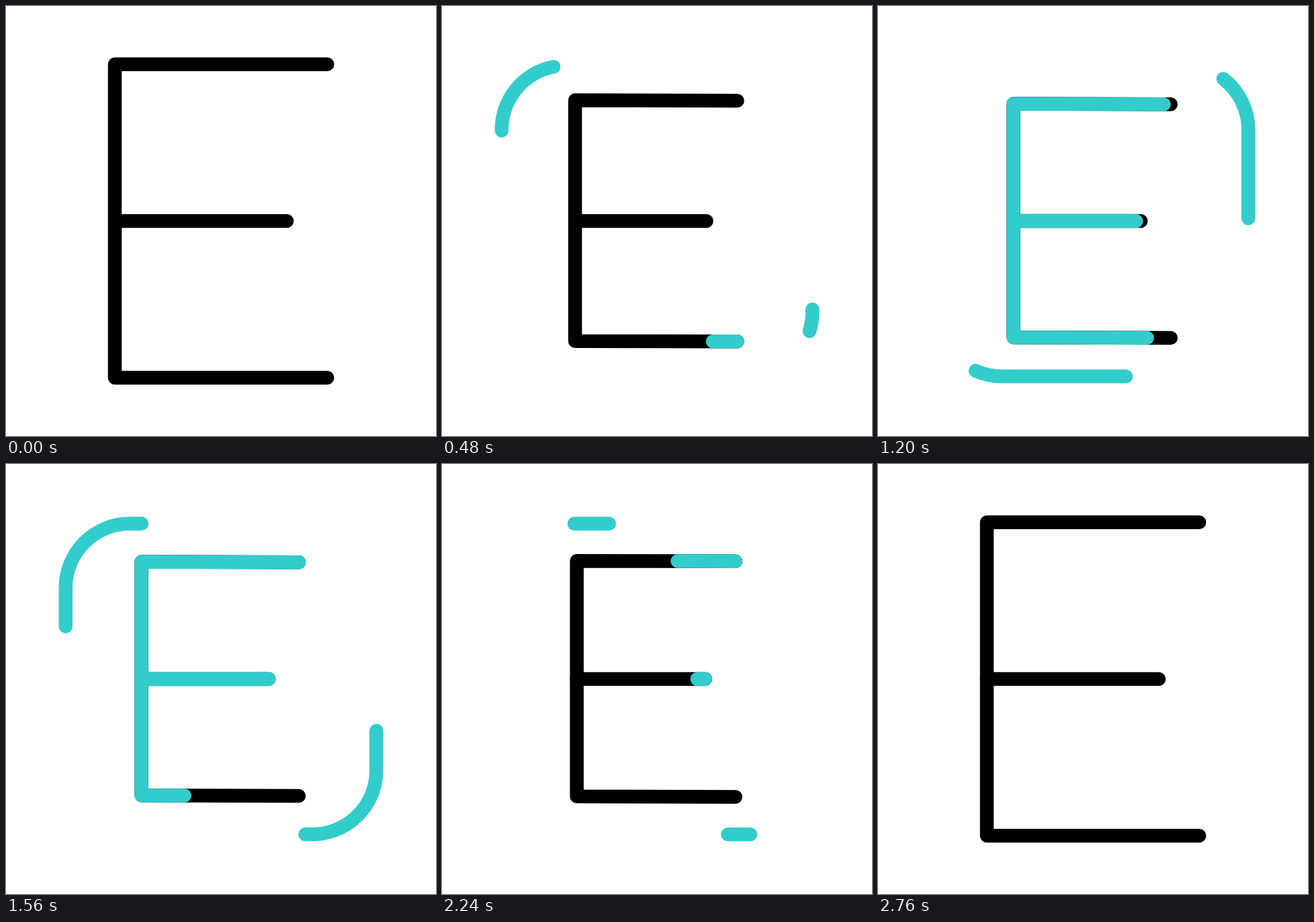
Animation of 640x640 px, one loop 3 s. Source, as an HTML page with a canvas:

```html
<!DOCTYPE html>
<html lang="en">
<head>
<meta charset="utf-8">
<title>Letter E</title>
<style>
  html, body { margin: 0; width: 100%; height: 100%; overflow: hidden; background: #fff; }
  canvas { display: block; width: 640px; height: 640px; }
</style>
</head>
<body>
<canvas id="stage" width="640" height="640"></canvas>
<script>
const ctx = document.getElementById('stage').getContext('2d');
const LOOP = 3000, STEP = 40;
const BLACK = '#000', CYAN = '#33cccc';

const mix = (a, b, k) => a + (b - a) * k;

// Progress from t0 to t1 along cubic-bezier(a, 0, b, 1)
function ease(t, t0, t1, a = 0.333, b = 0.4) {
  const p = (t - t0) / (t1 - t0);
  if (p <= 0) return 0;
  if (p >= 1) return 1;
  let lo = 0, hi = 1, s = 0.5;
  for (let i = 0; i < 30; i++) {
    const r = 1 - s;
    const x = 3 * r * r * s * a + 3 * r * s * s * b + s * s * s;
    if (x < p) lo = s; else hi = s;
    s = (lo + hi) / 2;
  }
  return s * s * (3 - 2 * s);
}

function polyline(points) {
  const path = new Path2D();
  let length = 0;
  points.forEach(([x, y], i) => {
    path.lineTo(x, y);
    if (i) length += Math.hypot(x - points[i - 1][0], y - points[i - 1][1]);
  });
  return { path, length };
}

// Strokes only the part of a path between two distances
function strokePart(path, from, to, color) {
  if (to - from < 0.05) return;
  ctx.strokeStyle = color;
  ctx.setLineDash([to - from, 9999]);
  ctx.lineDashOffset = -from;
  ctx.stroke(path);
  ctx.setLineDash([]);
}

// Rounded frame, clockwise from the middle of its left side
const frame = new Path2D();
{
  const lo = 88.75, hi = 551.25, r = 95.5;
  frame.moveTo(lo, 320);
  frame.arcTo(lo, lo, hi, lo, r);
  frame.arcTo(hi, lo, hi, hi, r);
  frame.arcTo(hi, hi, lo, hi, r);
  frame.arcTo(lo, hi, lo, lo, r);
  frame.closePath();
}

function drawLetter(t) {
  const k = ease(t, 167, 603) - ease(t, 2190, 2768);
  const left = mix(162, 201.6, k), right = mix(478.2, 435.8, k);
  const top = mix(86.7, 145.6, k), bottom = mix(553.3, 493.3, k);
  const tilt = 0.7 * k;
  const body = polyline([[right, bottom + tilt], [left, bottom], [left, top], [right, top + tilt]]);
  const bar = polyline([[left, 320], [mix(418, 391.2, k), 320]]);

  ctx.strokeStyle = BLACK;
  ctx.stroke(body.path);
  ctx.stroke(bar.path);

  const trim = ({ path, length }, tail, head) =>
    strokePart(path, tail * length, head * length, CYAN);
  trim(body, ease(t, 870, 2431, 0.6145, 0.8), ease(t, 373, 1305));
  trim(bar, ease(t, 1890, 2351), ease(t, 740, 1305));
}

// A dash grows, travels half way round the frame, then shrinks into its head
function drawDash(t, { start, length, travel, grow, move, shrink, turned }) {
  const shift = start + travel * ease(t, ...move);
  ctx.save();
  if (turned) {
    ctx.translate(640, 640);
    ctx.rotate(Math.PI);
  }
  strokePart(frame, shift + length * ease(t, ...shrink), shift + length * ease(t, ...grow), CYAN);
  ctx.restore();
}

const dashes = [
  { start: 134.5, length: 219, travel: 805, turned: false,
    grow: [198, 812], move: [775, 1705], shrink: [1970, 2392] },
  { start: 131.5, length: 225, travel: 836, turned: true,
    grow: [384, 850], move: [984, 1730], shrink: [2038, 2392] }
];

function draw(t) {
  ctx.fillStyle = '#fff';
  ctx.fillRect(0, 0, 640, 640);
  ctx.lineWidth = 20.5;
  ctx.lineCap = ctx.lineJoin = 'round';
  drawLetter(t);
  dashes.forEach(dash => drawDash(t, dash));
}

const begin = performance.now();
function tick() {
  const t = (performance.now() - begin + 2) % LOOP;
  draw(Math.floor(t / STEP) * STEP);
  requestAnimationFrame(tick);
}
tick();
</script>
</body>
</html>
```
